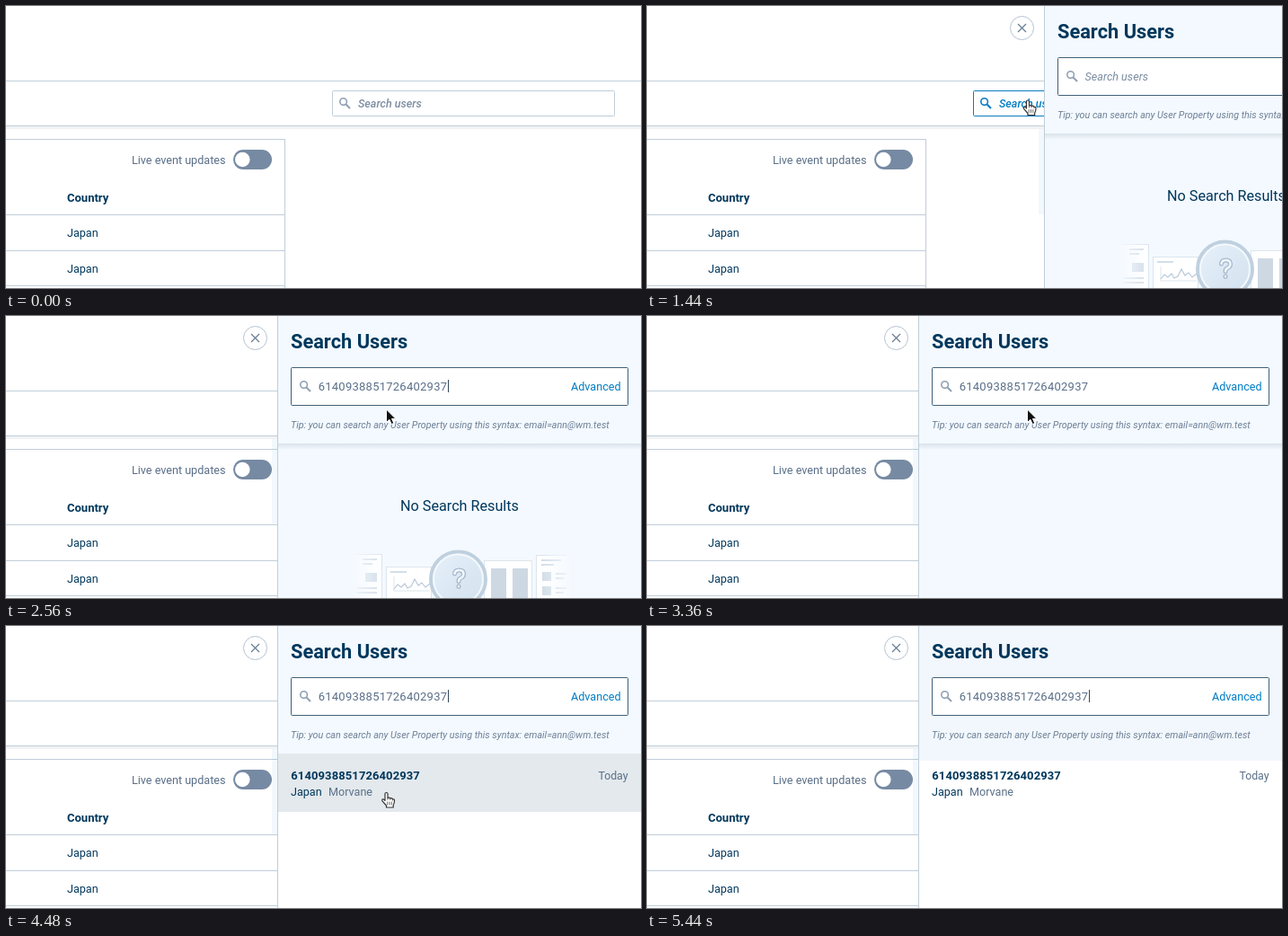
Animation, 707 px wide and 314 px high, one loop 5.92 s. Source, as an HTML page:

```html
<!DOCTYPE html>
<html lang="en">
<head>
<meta charset="utf-8">
<title>User search</title>
<style>
  html, body { margin: 0; width: 100%; height: 100%; overflow: hidden; background: #fff; }
  svg { display: block; width: 707px; height: 314px; }
  text { font: 12.6px Roboto, "Noto Sans", sans-serif; fill: #00375b; white-space: pre; }
  .muted { fill: #5a6f88; }
  .bold { font-weight: 600; }
  .hint { font-style: italic; fill: #7b8ca1; }
  .id { font-size: 13px; letter-spacing: .25px; }
  .id.bold { letter-spacing: .1px; }
  .link { fill: #007dc3; }
  .line { fill: #c2ced9; }
  #box { fill: #fff; stroke: #c0cdd8; }
  #find { font-size: 12.5px; font-weight: 500; }
  #lens { stroke: #8fa0b3; }
  .hover #box { stroke: #0a7cc1; }
  .hover #find { fill: #007dc3; }
  .hover #lens { stroke: #0a7cc1; }
  .doc { fill: #fff; stroke: #dce5ed; }
  .ink { fill: #d3dee8; }
</style>
</head>
<body>
<svg viewBox="0 0 707 314">
  <defs>
    <g id="glass" fill="none" stroke-width="1.6">
      <circle cx="4.6" cy="4.6" r="3.8"/>
      <path d="M7.5 7.5 12 12" stroke-width="2"/>
    </g>
    <linearGradient id="drop" x2="0" y2="1">
      <stop stop-color="#dae2ea"/><stop offset="1" stop-color="#f4f9ff"/>
    </linearGradient>
    <linearGradient id="fade">
      <stop stop-color="#f4f9ff"/><stop offset=".14" stop-color="#f4f9ff" stop-opacity="0"/>
      <stop offset=".86" stop-color="#f4f9ff" stop-opacity="0"/><stop offset="1" stop-color="#f4f9ff"/>
    </linearGradient>
    <linearGradient id="lensFill" x2="1" y2="1">
      <stop stop-color="#e6f0f9"/><stop offset="1" stop-color="#d2e1ef"/>
    </linearGradient>
  </defs>

  <rect width="707" height="314" fill="#fff"/>
  <g class="line">
    <rect y="83" width="707" height="1"/>
    <rect y="133" width="707" height="1"/>
    <rect y="148" width="311" height="1"/>
    <rect x="310" y="148" width="1" height="166"/>
    <rect y="232" width="310" height="1"/>
    <rect y="272" width="310" height="1"/>
    <rect y="311" width="310" height="1"/>
  </g>
  <rect y="134" width="707" height="3" fill="#f0f2f4"/>
  <text class="muted" x="140" y="176">Live event updates</text>
  <rect x="253" y="160" width="43" height="22" rx="11" fill="#768aa3"/>
  <circle cx="263.3" cy="171" r="8.3" fill="#fff"/>
  <text class="bold" x="68" y="218" style="font-size:13px">Country</text>
  <text x="68" y="257">Japan</text>
  <text x="68" y="297">Japan</text>

  <g id="field">
    <rect id="box" x="363.5" y="94.5" width="314" height="28" rx="1"/>
    <use id="lens" href="#glass" x="371" y="102"/>
    <text id="find" class="hint" x="392" y="113">Search users</text>
  </g>

  <g id="panel">
    <rect x="296" y="137" width="6" height="95" fill="#4a9be0" opacity=".07"/>
    <circle cx="277.5" cy="24.5" r="13" fill="#fff" stroke="#b5c2d0"/>
    <path d="M273 20l9 9m0-9l-9 9" stroke="#6b7f96" stroke-width="1.3"/>
    <rect id="body" x="302" width="405" height="314"/>
    <rect id="head" x="302" width="405"/>
    <rect id="under" x="302" y="142" width="405" height="7" fill="url(#drop)"/>

    <g id="empty">
      <text x="439" y="217" style="font-size:16.2px">No Search Results</text>
      <rect class="doc" x="384.5" y="265.5" width="34" height="60"/>
      <g class="ink">
        <rect x="397" y="270" width="16" height="2"/><rect x="397" y="275" width="11" height="2"/>
        <rect x="400" y="286" width="13" height="10"/><rect x="390" y="302" width="23" height="2"/>
        <rect x="390" y="307" width="23" height="2"/>
      </g>
      <rect class="doc" x="423.5" y="279.5" width="50" height="40"/>
      <rect class="ink" x="428" y="284" width="18" height="2"/>
      <path d="M432 290v16h40" fill="none" stroke="#dce5ed"/>
      <path d="M432 304l4-5 4 3 4-4 3 5 4-2 4-8 4 7 4-3 4 5 5-4" fill="none" stroke="#b9c9d8" stroke-width="1.2"/>
      <rect class="doc" x="532.5" y="272.5" width="53" height="50"/>
      <rect x="540" y="281" width="17" height="33" fill="#cdd8e3"/>
      <rect x="564" y="281" width="17" height="33" fill="#cdd8e3"/>
      <rect class="doc" x="590.5" y="266.5" width="40" height="60"/>
      <g class="ink">
        <rect x="596" y="271" width="22" height="2"/><rect x="596" y="276" width="14" height="2"/>
        <rect x="597" y="285" width="10" height="10"/><rect x="612" y="286" width="12" height="2"/>
        <rect x="612" y="291" width="9" height="2"/><rect x="597" y="301" width="10" height="10"/>
        <rect x="612" y="302" width="12" height="2"/><rect x="612" y="307" width="9" height="2"/>
      </g>
      <rect x="384" y="262" width="248" height="52" fill="url(#fade)"/>
      <circle cx="503.5" cy="293" r="30.5" fill="url(#lensFill)" stroke="#bfd0df" stroke-width="4"/>
      <circle cx="503.5" cy="293" r="27.5" fill="none" stroke="#f3f8fc" stroke-width="2"/>
      <g fill="none" stroke-linecap="round" stroke-linejoin="round">
        <path id="mark" d="M499.5 287q.5-4 5-4 5 0 5 4.500 0 3-3.500 4.500-2 1-2 3.500M504 301v.2" stroke="#a3b7ca" stroke-width="5"/>
        <path d="M499.500 287q.5-4 5-4 5 0 5 4.500 0 3-3.500 4.500-2 1-2 3.500M504 301v.2" stroke="#f0f6fb" stroke-width="2.600"/>
      </g>
    </g>

    <g id="result">
      <rect id="row" x="302" y="142" width="405" height="65" fill="#e3e9ed"/>
      <text class="bold id" x="317.300" y="171">6140938851726402937</text>
      <text class="muted" x="692.500" y="171" text-anchor="end" style="font-size:12.300px">Today</text>
      <text x="317" y="189">Japan</text>
      <text class="muted" x="359" y="189">Morvane</text>
    </g>

    <rect x="302" width="1" height="314" fill="#c0ced9"/>
    <text class="bold" x="317" y="36" style="font-size:21.800px">Search Users</text>
    <rect x="317.500" y="57.500" width="375" height="42" rx="1" fill="#fff" stroke="#3f6079"/>
    <use href="#glass" x="327" y="72" stroke="#8fa0b3"/>
    <text id="hint" class="hint" x="347.500" y="83">Search users</text>
    <text id="typed" class="muted id" x="347.700" y="83">6140938851726402937</text>
    <rect id="caret" y="71" width="1" height="14" fill="#33475b"/>
    <text class="link" x="629" y="83">Advanced</text>
    <text class="hint" x="317" y="125" style="font-size:10.730px;fill:#6d7f95">Tip: you can search any User Property using this syntax: email=ann@wm.test</text>
  </g>

  <g id="arrow">
    <path d="M0 0v14.500l3.400-3.200 2.300 5.200 2.600-1.100-2.300-5h4.400z" fill="#111" stroke="#fff" stroke-width="1"/>
  </g>
  <g id="hand" stroke-linejoin="round" stroke-linecap="round">
    <path d="M-1.500 9V1.300Q-1.500 0 0 0T1.500 1.300V6q1.800-1 2.800.5 1.700-.8 2.700.8 2-.4 2 1.700 0 3-1.300 5V16.500H0V14.500L-4.500 9.300q-.8-1.800.8-2 1.200 0 2.200 1.700z" fill="#fff" stroke="#333" stroke-width="1.200"/>
    <path d="M1.200 10.500v3M3.500 10.500v3M5.800 10.500v3M1.500 6v2M4.300 6.500V8M7 7.300V8.600" stroke="#444" stroke-width=".8"/>
  </g>
  <g id="beam" fill="none">
    <path d="M-3.500-7q3 0 3.500 1.500Q.5-7 3.500-7M-3.500 7q3 0 3.500-1.500Q.5 7 3.500 7M0-5.500v11M-2 2h4" stroke="#fff" stroke-width="2.500"/>
    <path d="M-3.500-7q3 0 3.500 1.500Q.5-7 3.500-7M-3.500 7q3 0 3.500-1.500Q.5 7 3.500 7M0-5.500v11M-2 2h4" stroke="#333" stroke-width="1.200"/>
  </g>
</svg>
<script>
const LOOP = 5920;
const $ = id => document.getElementById(id);
const cursors = ["arrow", "hand", "beam"];

// Each step lists only what changes at that time (ms).
const steps = [
  [0, { cursor: null, hover: false, slide: null, typed: false, caret: false, view: "empty", row: false }],
  [160, { cursor: ["arrow", 425, 180] }],
  [320, { cursor: ["arrow", 439, 145] }],
  [480, { cursor: ["arrow", 426, 104] }],
  [640, { cursor: ["hand", 426, 104] }],
  [800, { hover: true }],
  [960, { cursor: ["hand", 424, 105] }],
  [1440, { slide: 140 }],
  [1600, { slide: 0, caret: true }],
  [1920, { cursor: ["arrow", 423.5, 104], caret: false }],
  [2400, { caret: true }],
  [2560, { typed: true }],
  [3040, { caret: false }],
  [3360, { view: "blank" }],
  [3520, { caret: true }],
  [3680, { view: "result" }],
  [4000, { cursor: ["beam", 423.5, 134], caret: false }],
  [4160, { cursor: ["hand", 423.5, 185.5], row: true }],
  [4480, { caret: true }],
  [4800, { cursor: ["arrow", 423.5, 271], row: false }],
  [4960, { cursor: null, caret: false }],
  [5440, { caret: true }]
];

const show = (id, on) => $(id).style.display = on ? "" : "none";
const attr = (id, name, value) => $(id).setAttribute(name, value);

function stateAt(t) {
  const s = {};
  for (const [at, change] of steps) if (at <= t) Object.assign(s, change);
  return s;
}

function draw(t) {
  const s = stateAt(t);
  const found = s.view === "result";

  $("field").classList.toggle("hover", s.hover);
  show("panel", s.slide !== null);
  attr("panel", "transform", `translate(${s.slide || 0} 0)`);
  attr("body", "fill", found ? "#fff" : "#f4f9ff");
  attr("head", "fill", found && !s.row ? "#f1f7fc" : "#f3f9ff");
  attr("head", "height", found && !s.row ? 150 : 142);
  show("under", !found);
  show("empty", s.view === "empty");
  show("result", found);
  show("row", s.row);

  show("hint", !s.typed);
  show("typed", s.typed);
  show("caret", s.caret);
  attr("caret", "x", s.typed ? 492 : 348);

  for (const name of cursors) show(name, s.cursor && s.cursor[0] === name);
  if (s.cursor) {
    const [name, x, y] = s.cursor;
    attr(name, "transform", `translate(${x} ${y})`);
  }
}

const start = performance.now();
function tick() {
  draw((performance.now() - start) % LOOP);
  requestAnimationFrame(tick);
}
tick();
</script>
</body>
</html>
```
